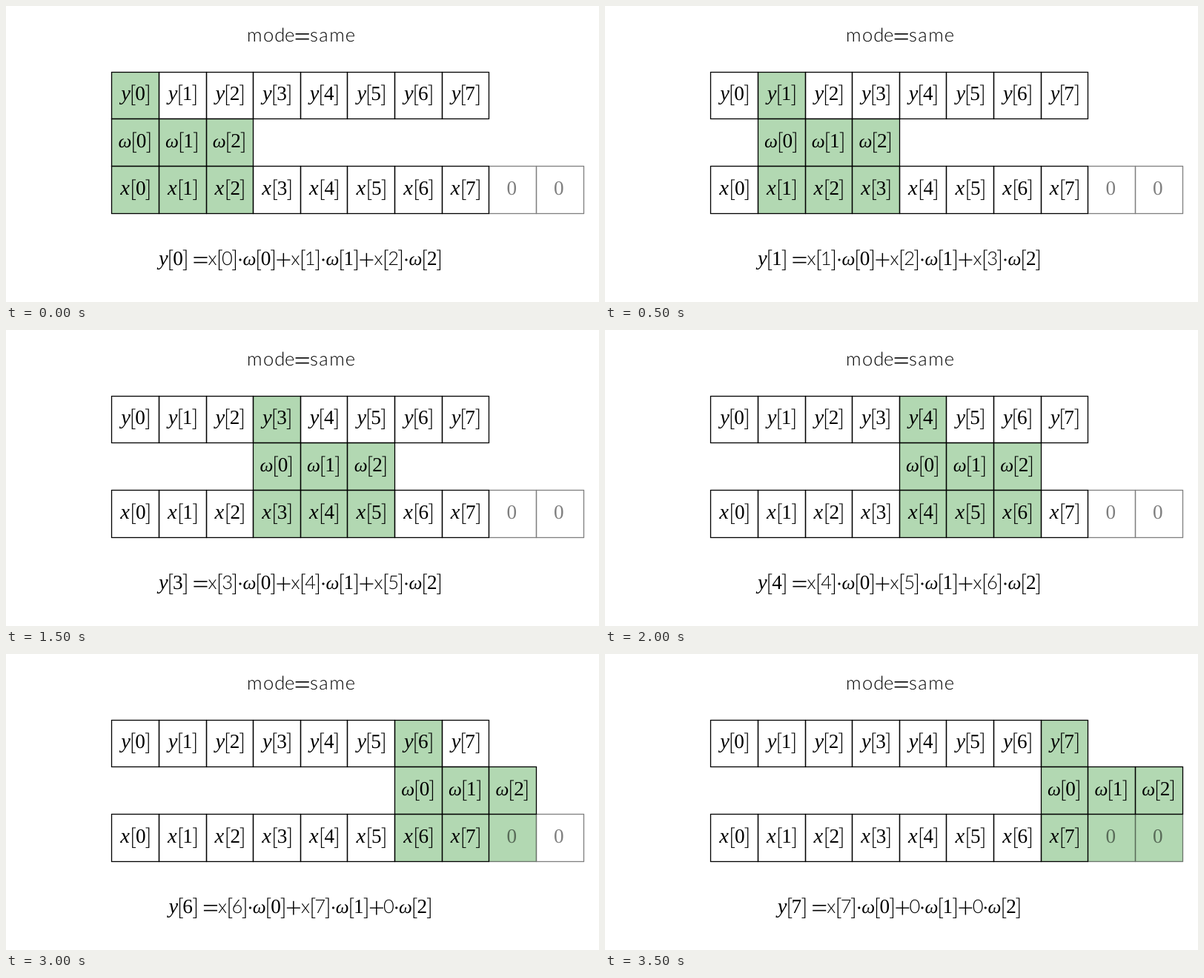
Recreate the animation shown at these times as an HTML page. Size 800 by 400 pixels, loop 4000 ms.

```html
<!DOCTYPE html>
<html lang="en">
<head>
<meta charset="utf-8">
<title>mode=same</title>
<style>
  html, body { margin: 0; width: 100%; height: 100%; overflow: hidden; background: #fff; }
  svg { display: block; text-rendering: geometricPrecision; }
  .cell { fill: none; stroke: #000; stroke-width: 1.3; }
  .lit { fill: #b2d8b2; }
  .pad { opacity: .5; }
  .step { opacity: 0; animation: show 4s step-end infinite; }
  @keyframes show { 0% { opacity: 1; } 12.5%, 100% { opacity: 0; } }
</style>
</head>
<body>
<svg id="stage" width="800" height="400" xmlns="http://www.w3.org/2000/svg"></svg>
<script>
const SIZE = 63.64, LEFT = 142.75, TOP = 89.3, STEPS = 8, TAPS = 3;
const AXIS = 7.1;                       // height of the math axis above the baseline
const SERIF = '"Liberation Serif", serif', SANS = 'Lato, sans-serif';
const ADVANCE = {
  math: { y: 14.2, x: 15.4, 'ω': 17.2, '[': 7.2, ']': 7.2, '=': 20.2, '+': 20.2, '·': 7.2, ' ': 6.6 },
  sans: { x: 12, '[': 7.4, ']': 7.4, m: 23, o: 14.5, d: 15, e: 12.9, '=': 20.6, s: 11.1, a: 14 }
};
const DIGIT = 13.1;

const stage = document.getElementById('stage');
const pen = document.createElement('canvas').getContext('2d');

function add(parent, tag, attrs) {
  const el = document.createElementNS('http://www.w3.org/2000/svg', tag);
  for (const key in attrs) el.setAttribute(key, attrs[key]);
  return parent.appendChild(el);
}

// Ink box of a glyph at a size of 1px, y upwards
function ink(ch, style, weight, family) {
  pen.font = `${style} ${weight} 100px ${family}`;
  const m = pen.measureText(ch);
  return {
    left: -m.actualBoundingBoxLeft / 100, right: m.actualBoundingBoxRight / 100,
    top: m.actualBoundingBoxAscent / 100, bottom: -m.actualBoundingBoxDescent / 100
  };
}

const advance = (ch, kind) => ADVANCE[kind][ch] || DIGIT;

function glyph(parent, ch, kind, x, base) {
  const bracket = '[]'.includes(ch), operator = '=+'.includes(ch), dot = ch === '·';
  const sans = kind === 'sans';
  const family = sans || bracket || operator ? SANS : SERIF;
  const weight = family === SANS ? 300 : 400;
  const style = !sans && 'yxω'.includes(ch) ? 'italic' : 'normal';
  const box = ink(ch, style, weight, family);

  let size = sans ? 25.5 : style === 'italic' ? 28.5 : 27.2;
  if (ch === 'ω') size = Math.min(28.5, 16.2 / (box.right - box.left));
  if (bracket) size = 28 / (box.top - box.bottom);
  if (operator) size = 18.4 / (box.right - box.left);

  const at = ch === '[' ? .65 : ch === ']' ? .35 : .5;
  const cx = x + advance(ch, kind) * at;
  const lift = bracket || operator || dot ? (box.top + box.bottom) / 2 * size - AXIS : 0;
  add(parent, 'text', {
    x: (cx - (box.left + box.right) / 2 * size).toFixed(2),
    y: (base + lift).toFixed(2),
    'font-family': family, 'font-size': size.toFixed(2),
    'font-weight': weight, 'font-style': style
  }).textContent = ch;
}

// Sets runs of [text, kind] on one line, centred on cx
function line(parent, cx, base, ...runs) {
  const chars = runs.flatMap(([text, kind]) => [...text].map(ch => [ch, kind]));
  let x = cx - chars.reduce((sum, [ch, kind]) => sum + advance(ch, kind), 0) / 2;
  for (const [ch, kind] of chars) {
    if (ch !== ' ') glyph(parent, ch, kind, x, base);
    x += advance(ch, kind);
  }
}

// Grid lines sit on pixel centres
const edge = (start, i) => Math.floor(start + i * SIZE) + .5;

function box(parent, col, row, cls, cols = 1) {
  const x = edge(LEFT, col), y = edge(TOP, row);
  add(parent, 'rect', {
    x, y, width: edge(LEFT, col + cols) - x, height: edge(TOP, row + 1) - y, class: cls
  });
}

function cell(parent, col, row, label, dx = -.5) {
  box(parent, col, row, 'cell');
  line(parent, LEFT + (col + .5) * SIZE + dx, TOP + row * SIZE + 38.1, [label, 'math']);
}

line(stage, 397.4, 48, ['mode=same', 'sans']);

for (let n = 0; n < STEPS; n++) {
  const step = add(stage, 'g', { class: 'step', style: `animation-delay: ${(n - STEPS) * 500}ms` });
  box(step, n, 0, 'lit');
  box(step, n, 1, 'lit', TAPS);
  box(step, n, 2, 'lit', TAPS);

  const runs = [[`y[${n}] =`, 'math']];
  for (let k = 0; k < TAPS; k++) {
    cell(step, n + k, 1, `ω[${k}]`);
    if (k) runs.push(['+', 'math']);
    runs.push([n + k < STEPS ? `x[${n + k}]` : '0', 'sans'], [`·ω[${k}]`, 'math']);
  }
  line(step, 396.2, 349.7, ...runs);
}

const pad = add(stage, 'g', { class: 'pad' });
for (let i = STEPS; i < STEPS + TAPS - 1; i++) cell(pad, i, 2, '0', -1.5);

for (let i = 0; i < STEPS; i++) {
  cell(stage, i, 0, `y[${i}]`);
  cell(stage, i, 2, `x[${i}]`);
}
</script>
</body>
</html>
```
